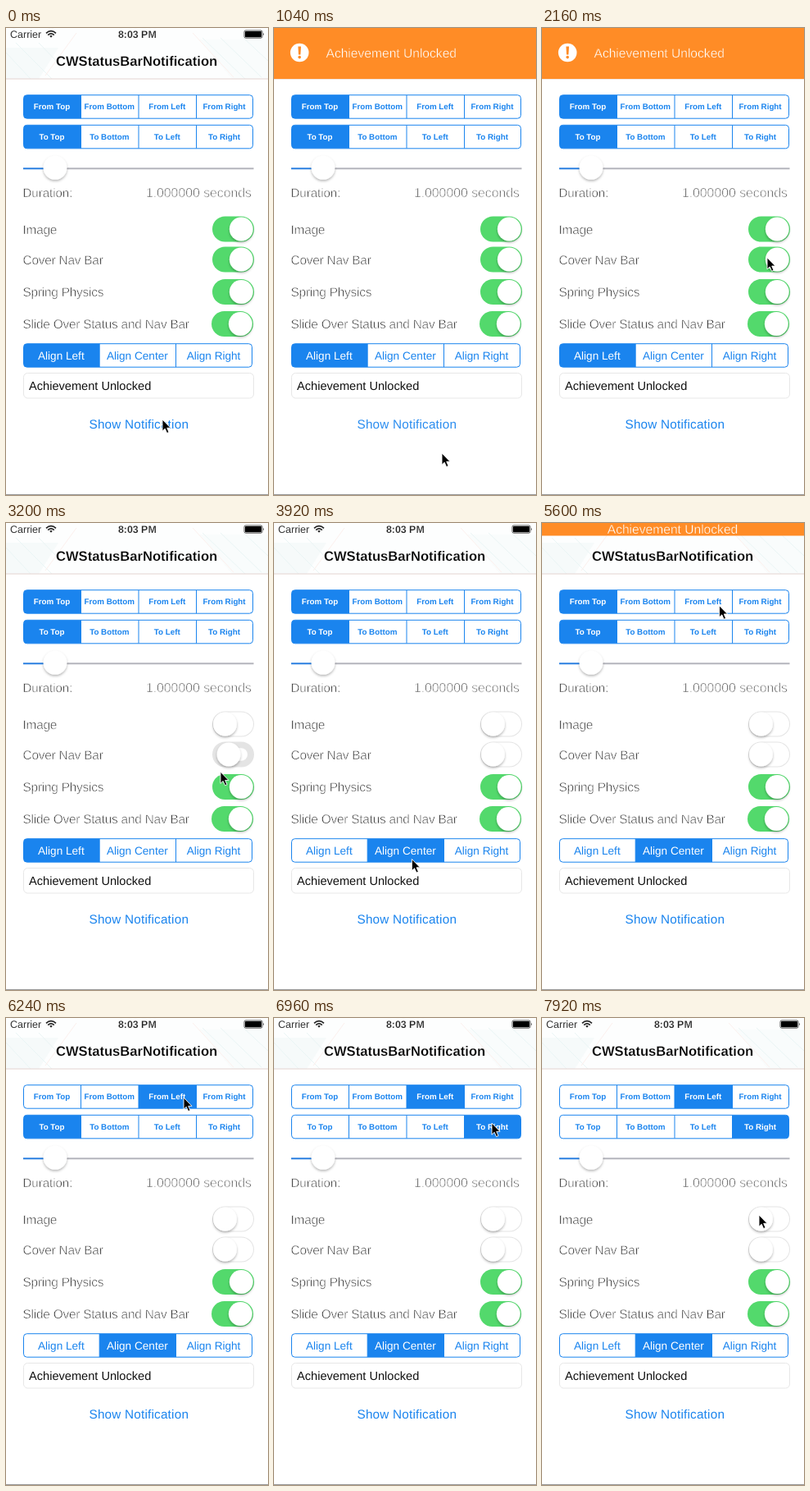
Write an HTML page that moves like this. It is 320 by 569 pixels and loops after 8 s.

```html
<!DOCTYPE html>
<html lang="en">
<head>
<meta charset="utf-8">
<title>Notification settings</title>
<style>
html, body { margin: 0; width: 100%; height: 100%; overflow: hidden; background: #fff; }
svg { display: block; width: 100vw; height: 100vh; }
text { font-family: "Liberation Sans", Arial, sans-serif; text-rendering: geometricPrecision; }
.bold { font-weight: 700; }
.medium { stroke: #fdfefe; stroke-width: .25px; }
.label { font-size: 15.4px; letter-spacing: -.22px; }
.thin { fill: #222; stroke: #fff; stroke-width: .6px; }
.hair { fill: #333; stroke: #fff; stroke-width: .75px; }
.banner { font-size: 15.6px; fill: #fff; stroke: #ff8c26; stroke-width: .35px; }
.mid { text-anchor: middle; }
</style>
</head>
<body>
<svg id="stage" viewBox="0 0 320 569">
  <defs>
    <filter id="shade" x="-40%" y="-40%" width="180%" height="190%">
      <feDropShadow dx="0" dy="1.8" stdDeviation="1.7" flood-color="#000" flood-opacity=".3"/>
    </filter>
  </defs>
  <rect width="320" height="569" fill="#fff"/>
  <path d="M0 568.5H320" stroke="#999"/>
  <g id="nav">
    <rect width="320" height="62" fill="#fdfefe"/>
    <path d="M0 24H64L40 62H0Z" fill="#f6fafa"/>
    <path d="M236 14H320V62H276Z" fill="#f9fcfc"/>
    <path d="M0 30L30 62M12 18L56 62M40 18L66 45M240 12L292 62M262 12L312 60M290 12L320 40" stroke="#eaf5f5" fill="none"/>
    <path d="M86 6L48 58M228 6L278 60" stroke="#fcf0ed" fill="none"/>
    <path d="M0 62H320" stroke="#e3d3d0"/>
    <text x="5" y="11.8" font-size="12.5" fill="#333">Carrier</text>
    <g fill="none" stroke="#222" stroke-width="1.7">
      <path d="M49 6.3Q55 1 61 6.3M51.2 8.6Q55 5.2 58.8 8.6"/>
      <path d="M53.2 9.7Q55 8.5 56.8 9.7L55 11.7Z" fill="#222" stroke="none"/>
    </g>
    <text class="bold mid medium" x="160.3" y="11.8" font-size="12.4" fill="#222">8:03 PM</text>
    <rect x="291" y="3" width="22" height="9.2" rx="1.8" fill="none" stroke="#222" stroke-width=".8"/>
    <rect x="292" y="3.9" width="20" height="7.4" rx=".8" fill="#000"/>
    <path d="M314.3 6Q316 7.6 314.3 9.3Z" fill="#222"/>
    <text class="bold mid medium" x="159.6" y="45.6" font-size="16.6">CWStatusBarNotification</text>
  </g>
  <g id="panel">
    <path d="M21 171.3H60" stroke="#2a7fe0" stroke-width="2"/>
    <path d="M60 171.3H302.5" stroke="#b4b5bc" stroke-width="2"/>
    <circle cx="60" cy="170.2" r="14.4" fill="#fff" filter="url(#shade)"/>
    <text class="thin" x="20.5" y="206" font-size="15">Duration:</text>
    <text class="hair" x="300" y="206" font-size="15.8" text-anchor="end">1.000000 seconds</text>
    <rect x="21.5" y="420.5" width="281" height="30.5" rx="5" fill="#fff" stroke="#e7e7e7"/>
    <text x="28" y="440.8" font-size="14.6" fill="#111">Achievement Unlocked</text>
    <text id="show" class="mid" x="162.3" y="488" font-size="15.3" letter-spacing=".2" fill="#1a84ee">Show Notification</text>
  </g>
  <g id="tall">
    <rect y="-40" width="320" height="102" fill="#ff8c26"/>
    <circle cx="31.2" cy="30" r="11.3" fill="#fff"/>
    <path d="M29.4 22.5H33L32.4 32.5H30Z" fill="#ff8c26"/>
    <circle cx="31.2" cy="35.6" r="1.8" fill="#ff8c26"/>
    <text class="banner" x="63.5" y="36">Achievement Unlocked</text>
  </g>
  <g id="short">
    <rect y="-20" width="320" height="35.5" fill="#ff8c26"/>
    <text class="banner mid" x="159.5" y="13">Achievement Unlocked</text>
  </g>
  <path id="cursor" d="M0 0V14.2L3.2 11.2L5.6 16.6L8 15.5L5.7 10.3H10Z" fill="#000" stroke="#fff" stroke-width=".9"/>
</svg>
<script>
const LOOP = 8000;
const BLUE = '#1a84ee';
const $ = id => document.getElementById(id);
const panel = $('panel');

function add(parent, tag, attrs, text) {
  const el = document.createElementNS('http://www.w3.org/2000/svg', tag);
  for (const k in attrs) el.setAttribute(k, attrs[k]);
  if (text) el.textContent = text;
  parent.appendChild(el);
  return el;
}

const clamp = v => Math.max(0, Math.min(1, v));
const mix = (a, b, p) => a + (b - a) * p;
const smooth = p => p * p * (3 - 2 * p);
const easeOut = p => 1 - (1 - p) ** 2;
const place = (el, x, y) => el.setAttribute('transform', `translate(${x.toFixed(2)} ${y.toFixed(2)})`);

// Segmented control; edges are the x positions of its borders and dividers.
function segments(id, edges, y, size, bold, names) {
  const x = edges[0], w = edges[edges.length - 1] - x, h = 28.5;
  const frame = { x, y, width: w, height: h, rx: 4 };
  const clip = add(panel, 'clipPath', { id });
  add(clip, 'rect', frame);
  const g = add(panel, 'g', { 'clip-path': `url(#${id})` });
  const cells = names.map((name, i) => {
    const left = edges[i], right = edges[i + 1];
    return {
      box: add(g, 'rect', { x: left, y, width: right - left, height: h }),
      text: add(g, 'text', {
        class: bold ? 'mid bold' : 'mid', x: (left + right) / 2 - .5,
        y: y + h / 2 + size * .34, 'font-size': size
      }, name)
    };
  });
  for (const e of edges.slice(1, -1)) add(g, 'path', { d: `M${e} ${y}v${h}`, stroke: BLUE });
  add(panel, 'rect', { ...frame, fill: 'none', stroke: BLUE });
  return pick => cells.forEach((c, i) => {
    c.box.setAttribute('fill', i === pick ? BLUE : '#fff');
    c.text.setAttribute('fill', i === pick ? '#fff' : BLUE);
  });
}

function toggle(name, y, x) {
  add(panel, 'text', { class: 'label thin', x: 20.5, y: y + 5.7 }, name);
  const pill = add(panel, 'rect', { x, y: y - 15.6, width: 51, height: 31.2, rx: 15.6 });
  const hole = add(panel, 'rect', { fill: '#fff' });
  const knob = add(panel, 'circle', { cy: y, r: 14.4, fill: '#fff', filter: 'url(#shade)' });
  return off => {
    const c = clamp(off * 2);
    const rgb = [[83, 228], [217, 228], [108, 228]].map(([a, b]) => Math.round(mix(a, b, c)));
    pill.setAttribute('fill', `rgb(${rgb})`);
    const s = smooth(off), pivot = x + 35;
    const box = { x: pivot - 34 * s, y: y - 14.6 * s, width: 49 * s, height: 29.2 * s, rx: 14.6 * s };
    for (const k in box) hole.setAttribute(k, box[k]);
    knob.setAttribute('cx', mix(x + 35.3, x + 15.5, easeOut(off)));
  };
}

const quarter = [21.5, 91.5, 162, 232.5, 301.5];
const from = segments('from', quarter, 81.7, 9.8, true, ['From Top', 'From Bottom', 'From Left', 'From Right']);
const to = segments('to', quarter, 118.3, 9.8, true, ['To Top', 'To Bottom', 'To Left', 'To Right']);
const align = segments('align', [21.5, 114.2, 207.5, 300.5], 384.7, 13.6, false, ['Align Left', 'Align Center', 'Align Right']);
const image = toggle('Image', 245, 252);
const cover = toggle('Cover Nav Bar', 282, 252);
const spring = toggle('Spring Physics', 321.5, 252);
const slide = toggle('Slide Over Status and Nav Bar', 360.5, 251);

// time, x, y
const path = [
  [0, 191, 477], [300, 191, 479], [560, 192, 483], [880, 192, 483], [1040, 205, 518],
  [1200, 207, 522], [1840, 207, 522], [2160, 275, 280], [2380, 272, 242], [2600, 272, 242],
  [2860, 267, 281], [3060, 267, 281], [3200, 262, 303], [3620, 168, 393], [3800, 168, 393],
  [4240, 170, 482], [4960, 170, 482], [5640, 217, 97], [6240, 217, 97], [6400, 218, 98],
  [6760, 266, 128], [7200, 266, 128], [7720, 265, 240], [8000, 265, 240]
];

const slope = (i, k) => (path[i + 1][k] - path[i][k]) / (path[i + 1][0] - path[i][0]);

function tangent(i, k) {
  if (i === 0 || i === path.length - 1) return 0;
  const a = slope(i - 1, k), b = slope(i, k);
  return a * b <= 0 ? 0 : 2 * a * b / (a + b);
}

// Monotone cubic through the pointer stops.
function pointer(t, k) {
  let i = 0;
  while (i < path.length - 2 && t >= path[i + 1][0]) i++;
  const a = path[i], b = path[i + 1], d = b[0] - a[0], p = (t - a[0]) / d;
  return mix(a[k], b[k], smooth(p))
    + d * p * (1 - p) * ((1 - p) * tangent(i, k) - p * tangent(i + 1, k));
}

function drop(el, t, start, end, h) {
  let y = -h - 25;
  if (t >= start && t < end + 240) {
    const s = (t - start) / 1000;
    const rest = Math.exp(-22 * s) * (Math.cos(18 * s) + 22 / 18 * Math.sin(18 * s));
    y = t < end ? -h * rest : -h * smooth((t - end) / 240);
  }
  place(el, 0, y);
  el.style.visibility = y <= -h ? 'hidden' : 'visible';
}

function fade(t, down, up) {
  if (t < down || t > up + 420) return 1;
  return t < up ? .25 : mix(.25, 1, smooth((t - up) / 420));
}

function draw(t) {
  from(t < 5800 ? 0 : 2);
  to(t < 6920 ? 0 : 3);
  align(t < 3720 ? 0 : 1);
  image(clamp((t - 2500) / 280));
  cover(clamp((t - 3060) / 270));
  spring(0);
  slide(0);
  $('show').setAttribute('opacity', Math.min(fade(t, 580, 700), fade(t, 4400, 4480)));
  drop($('tall'), t, 740, 2220, 62);
  drop($('short'), t, 4500, 5900, 15.5);
  place($('cursor'), pointer(t, 1), pointer(t, 2));
}

const begin = performance.now();
function tick() {
  draw((performance.now() - begin) % LOOP);
  requestAnimationFrame(tick);
}
draw(0);
requestAnimationFrame(tick);
</script>
</body>
</html>
```
